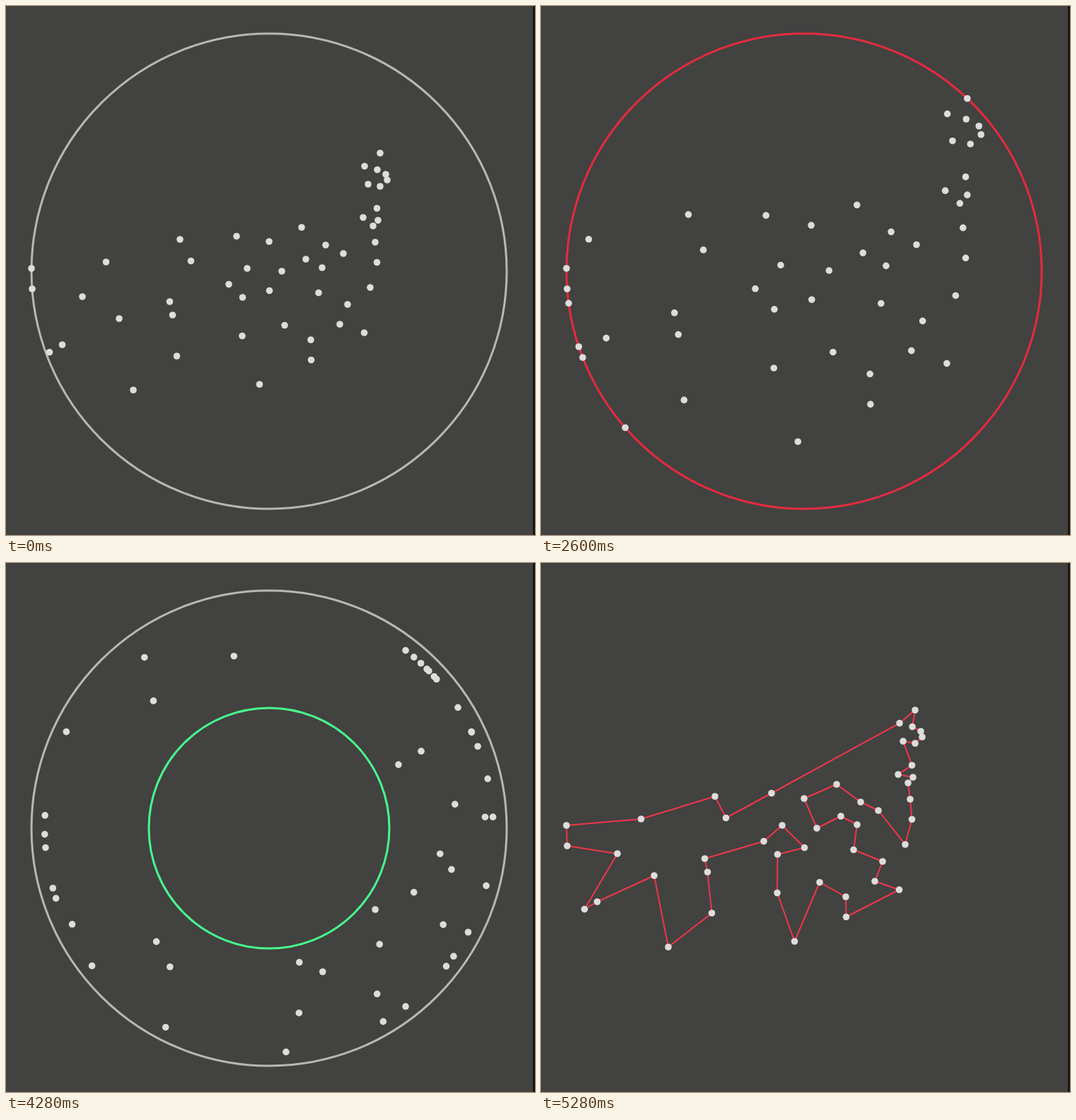
Recreate the animation shown at these times as an HTML page. Size 748 by 748 pixels, loop 8.8 s.

```html
<!DOCTYPE html>
<html lang="en">
<head>
<meta charset="utf-8">
<title>Tour on a ring</title>
<style>
  html, body { margin: 0; width: 100%; height: 100%; overflow: hidden; background: #424240; }
  svg { display: block; width: 100vw; height: 100vh; }
</style>
</head>
<body>
<svg viewBox="0 0 748 748">
  <rect width="748" height="748" fill="#424240"/>
  <rect x="745" width="3" height="748" fill="#161616"/>
  <polygon id="tour" fill="none" stroke="#f0364a" stroke-width="2" stroke-linejoin="round"/>
  <circle id="ring" cx="372" cy="375" r="336" fill="none" stroke-width="3"/>
  <circle id="core" cx="372" cy="375" fill="none" stroke="#48f88c" stroke-width="3"/>
  <g id="dots" fill="#dedddb"></g>
</svg>
<script>
const LOOP = 8800, START = 1600, STEP = 40;
const CX = 372, CY = 375, R = 336, DEG = Math.PI / 180;
// Steps at which each stage ends
const SPREAD = 35, RELEASE = 50, HOLLOW = 52, SQUEEZE = 78, DONE = 84;

// The drawing itself: corners in tour order
const corners = [
  507,226.5, 529,208, 525,231.5, 537,238, 539,246, 529,255, 512,252, 524.5,286,
  505,299, 526,303, 519,311, 522,334, 524.5,362.5, 515,398, 477,350, 452,338,
  418,313, 372,333, 390,375, 424,358, 447,370, 442,405.5, 483,422, 472,450,
  506.5,462, 431.5,500.5, 431,472, 394,451.5, 358.5,535, 334,466.5, 334.5,412, 372.5,402.5,
  341,371, 315,393.5, 231.5,418, 235.5,437, 241.5,495, 180,543, 160,442, 79.5,479,
  61.5,489.5, 108,411, 37,400, 36,371, 141.5,362, 246,330, 261.5,360.5, 326,325.5];
const home = [];
for (let i = 0; i < corners.length; i += 2) home.push([corners[i] - CX, corners[i + 1] - CY]);

const mix = (a, b, u) => a + (b - a) * u;
const mixPoint = (a, b, u) => [mix(a[0], b[0], u), mix(a[1], b[1], u)];
const clamp = (v, low, high) => Math.max(low, Math.min(high, v));
const length = p => Math.hypot(p[0], p[1]);
const angle = p => Math.atan2(p[1], p[0]);
const polar = (r, a) => [r * Math.cos(a), r * Math.sin(a)];
const zoomAt = k => 1 / (0.98 - 0.0125 * k);

// How far two close tour neighbours push each other apart along the rim
function push(p, next) {
  const near = Math.hypot(p[0] - next[0], p[1] - next[1]) < 30;
  const gap = Math.sin(angle(next) - angle(p));
  return near ? clamp(0.06 - gap, 0, 0.06) / 2 : 0;
}

// Dots grow with the zoom; the rim holds them and drags the inner ones back.
function expand(i, k) {
  const p = home[i], n = home.length;
  const zoom = zoomAt(k);
  const u = (zoom - 1) / (zoomAt(SPREAD) - 1);
  const inner = length(p) < 0.75 * R;
  const dx = inner ? 0.0175 * Math.max(0, 150 - p[0]) ** 1.5 : 0;
  const dy = 4.5e-5 * dx * dx * (p[1] - 95);
  const drag = u ** 2.2;
  const q = [p[0] * zoom + dx * drag, p[1] * zoom + dy * drag];
  const excess = length(q) / R - 1;
  if (excess <= 0) return q;
  const nudge = push(home[(i + n - 1) % n], p) - push(p, home[(i + 1) % n]);
  return polar(R, angle(q) + nudge * Math.min(1, 5 * excess));
}

// The middle slides down and right, while the upper left tears off upwards.
function open([x, y]) {
  const give = 1 - (Math.hypot(x, y) / R) ** 4;
  const torn = (1 + Math.tanh((-y - 0.5 * x - 90) / 20)) / 2;
  const q = [1.15 * x + give * mix(90, -5, torn), 1.15 * y + give * mix(70, -110, torn)];
  return polar(Math.min(length(q), 328), angle(q));
}

// Everything is pressed into the band between core and ring, parting at the right.
function press(p) {
  let a = angle(p);
  if (a < -100 * DEG) a += 2 * Math.PI;
  const turn = a < 3 * DEG ? -7.5 : 6 * Math.sin(0.72 * a);
  return polar(clamp(length(p), 262, 310), a + turn * DEG);
}

const spread = home.map((p, i) => expand(i, SPREAD));
const hollow = spread.map(open);
const squeezed = hollow.map(press);

function place(i, k) {
  if (k < 0 || k >= DONE) return home[i];
  if (k <= SPREAD) return expand(i, k);
  if (k <= HOLLOW) return mixPoint(spread[i], hollow[i], (k - SPREAD) / (HOLLOW - SPREAD));
  if (k <= SQUEEZE) return mixPoint(hollow[i], squeezed[i], (k - HOLLOW) / (SQUEEZE - HOLLOW));
  const p = squeezed[i];
  return polar(mix(length(p), 318, 0.12 * (k - SQUEEZE)), angle(p));
}

const [tour, ring, core, group] = ["tour", "ring", "core", "dots"].map(id => document.getElementById(id));
const dots = home.map(() => {
  const dot = document.createElementNS("http://www.w3.org/2000/svg", "circle");
  dot.setAttribute("r", 4.8);
  return group.appendChild(dot);
});
tour.setAttribute("points", home.map(p => [p[0] + CX, p[1] + CY]).join(" "));

const show = (node, on) => node.setAttribute("visibility", on ? "visible" : "hidden");

function draw(time) {
  const k = Math.floor((time % LOOP - START) / STEP);
  const done = k >= DONE;
  show(tour, done);
  show(ring, !done);
  show(core, k >= HOLLOW && !done);
  ring.setAttribute("stroke", k >= 0 && k < RELEASE ? "#e42b3e" : "#b8b7b3");
  core.setAttribute("r", clamp(6.4 + 10.91 * (k - HOLLOW), 0, 1.02 * R));
  dots.forEach((dot, i) => {
    const [x, y] = place(i, k);
    dot.setAttribute("cx", CX + x);
    dot.setAttribute("cy", CY + y);
  });
}

const began = performance.now();
function tick() {
  draw(performance.now() - began);
  requestAnimationFrame(tick);
}
tick();
</script>
</body>
</html>
```
